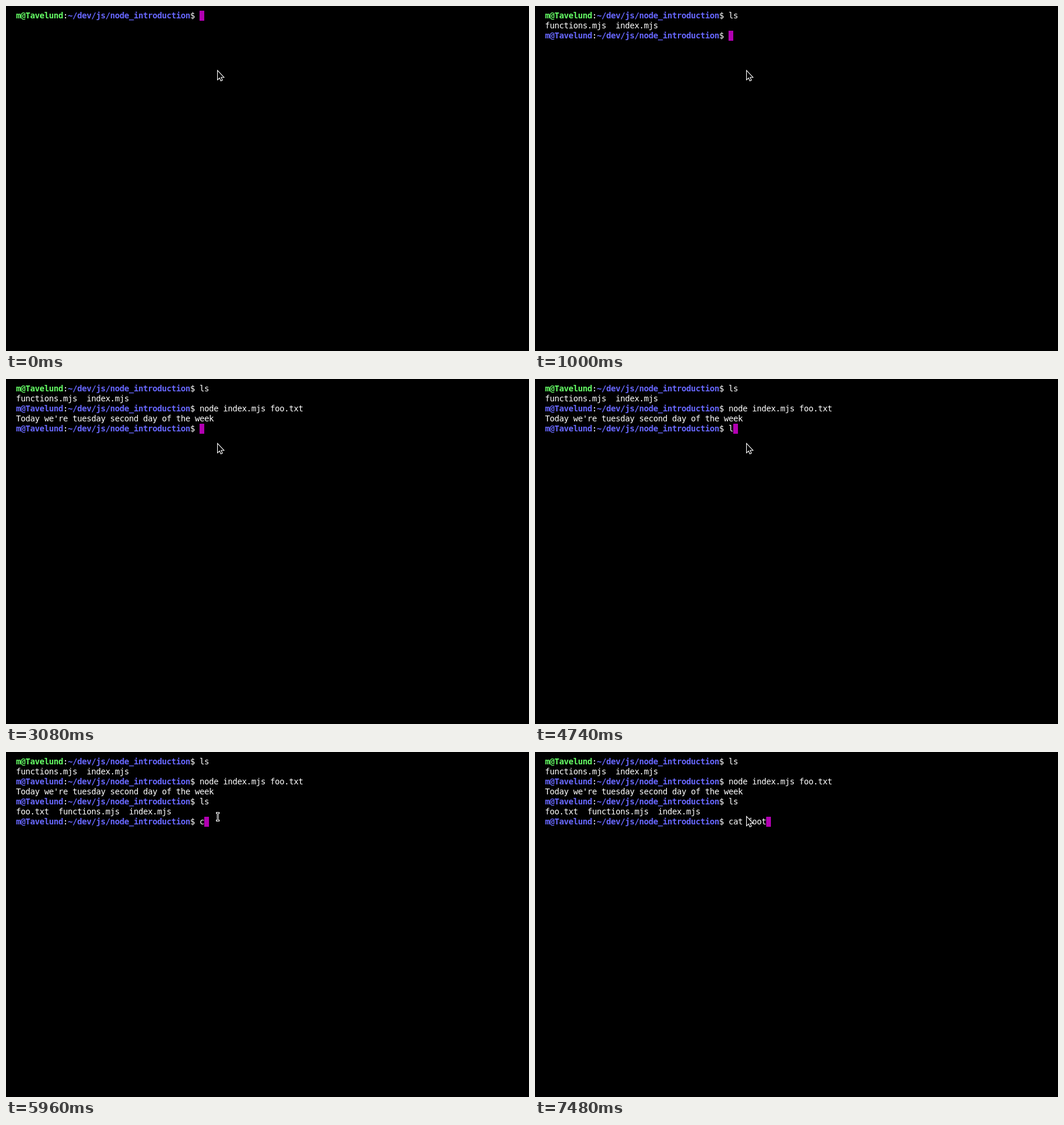
An HTML page for the animation above (8000 ms loop, 889 px wide and 586 px high).

```html
<!DOCTYPE html>
<html lang="en">
<head>
<meta charset="utf-8">
<title>Terminal session</title>
<style>
  html, body {
    margin: 0;
    width: 100%;
    height: 100%;
    overflow: hidden;
    background: #000;
  }
  #screen {
    position: absolute;
    left: 17px;
    top: 8px;
    margin: 0;
    color: #fff;
    font: 14px/17px "DejaVu Sans Mono", monospace;
    letter-spacing: calc(8px - 1ch); /* 8px terminal cells */
    font-variant-ligatures: none;
  }
  #screen b { color: #66ff66; }
  #screen b + b { color: #6868ff; }
  #screen i {
    display: inline-block;
    width: 8px;
    height: 17px;
    vertical-align: top;
    background: #b200b2;
  }
  svg {
    position: absolute;
    left: 0;
    top: 0;
  }
</style>
</head>
<body>
<pre id="screen"></pre>
<svg width="889" height="586" viewBox="0 0 889 586" fill="none">
  <path id="arrow" d="M359.5 109.3V125.6L363 122.3L365.2 127.2L367.9 126L365.8 121.2H370.6Z"
        fill="#000" stroke="#fff" stroke-width="1.1"/>
  <g id="beam">
    <path d="M357 103.5H363M357 116.5H363M360 103V117" stroke="#fff" stroke-width="3"/>
    <path d="M358 103.5H362M358 116.5H362M360 103V117" stroke="#000"/>
  </g>
</svg>
<script>
  const LOOP = 8000;
  const BEAM_FROM = 5000, BEAM_TO = 5980;
  const PROMPT = '<b>m@Tavelund</b>:<b>~/dev/js/node_introduction</b>$ ';

  // [time in ms, text appended to the terminal]
  const output = [
    [0, PROMPT],
    [500, 'l'],
    [620, 's'],
    [1000, '\nfunctions.mjs  index.mjs\n' + PROMPT],
    [1940, 'node index.mjs foo.txt'],
    [2940, '\n'],
    [3080, "Today we're tuesday second day of the week\n" + PROMPT],
    [4740, 'l'],
    [4820, 's'],
    [4980, '\nfoo.txt  functions.mjs  index.mjs\n' + PROMPT],
    [5960, 'c'],
    [6180, 'a'],
    [6420, 't'],
    [6840, ' '],
    [7060, 'f'],
    [7240, 'o'],
    [7360, 'o'],
    [7480, 't']
  ];

  const screen = document.getElementById('screen');
  const arrow = document.getElementById('arrow');
  const beam = document.getElementById('beam');
  const start = performance.now();
  let shown = 0;

  function draw(t) {
    const visible = output.filter(([time]) => time <= t);
    if (visible.length !== shown) {
      shown = visible.length;
      screen.innerHTML = visible.map(([, text]) => text).join('') + '<i></i>';
    }
    const overText = t >= BEAM_FROM && t < BEAM_TO;
    arrow.style.display = overText ? 'none' : '';
    beam.style.display = overText ? '' : 'none';
  }

  function tick() {
    draw(Math.max(0, performance.now() - start) % LOOP);
    requestAnimationFrame(tick);
  }
  tick();
</script>
</body>
</html>
```
